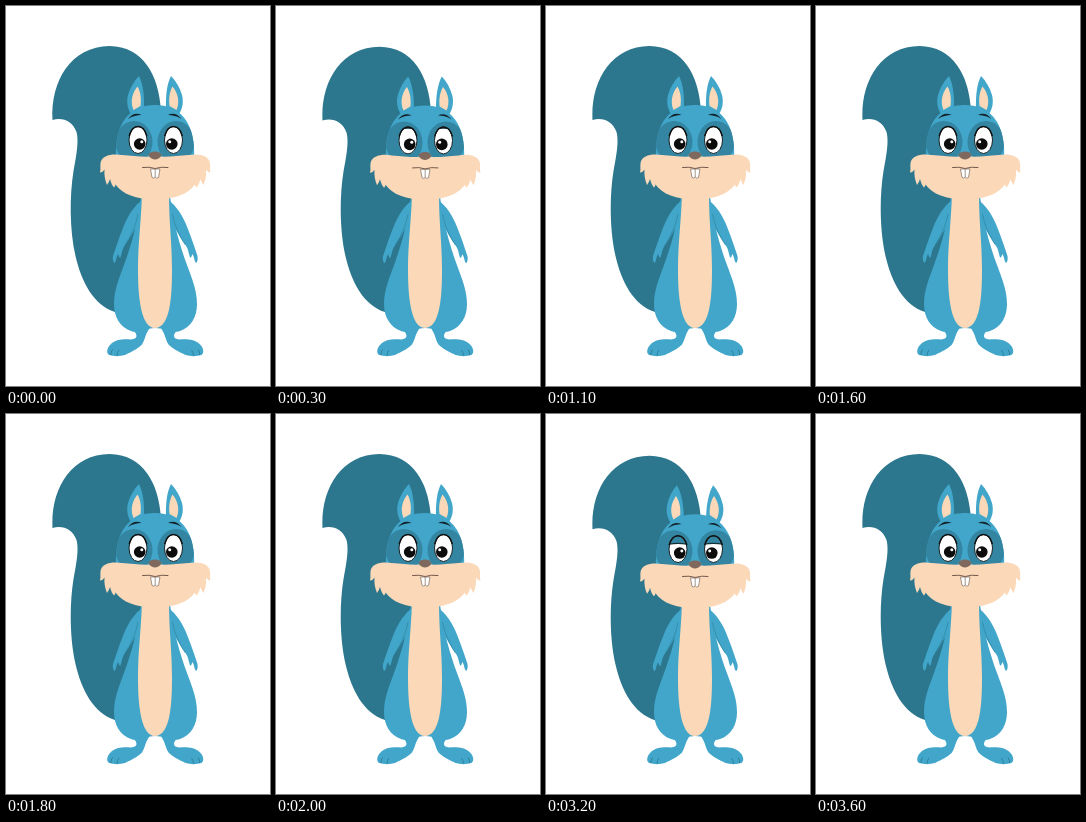
Write an HTML page that moves like this. It is 264 by 380 pixels and loops after 3800 ms.

```html
<!DOCTYPE html>
<html lang="en">
<head>
<meta charset="utf-8">
<title>Blue squirrel</title>
<style>
html, body { margin: 0; width: 100%; height: 100%; overflow: hidden; background: #fff; }
svg { display: block; width: 264px; height: 380px; }
.fur { fill: #41a6ca; }
.cream { fill: #fbd8b7; }
.mask { fill: #3485a1; }
</style>
</head>
<body>
<svg viewBox="0 0 264 380">
  <defs>
    <clipPath id="eyeClip"><ellipse cx="132" cy="134" rx="9" ry="13.500"/></clipPath>
    <clipPath id="headClip"><path d="M110 153C108 117 124 99 149 99C174 99 190 117 188 153Z"/></clipPath>

    <g id="ear"><g class="tilt">
      <path class="fur" d="M125 108C121 102 120.500 95 122 89C124.500 81 128 75 133 70C137 78 138.500 89 138 104Z"/>
      <path class="cream" d="M127.500 104C124 96 126 87 131.500 80.500C134.500 86 135.500 92 134.500 100Z"/>
    </g></g>

    <g id="arm">
      <path class="fur" d="M140 192C131 196 124 206 119 217C114 229 110 241 107 250C106.500 253 107 256 108.500 257C110.500 255 110 251 112 248C113 250 113 252 114.500 251.500C116 247 116 243 119 239C126 229 132 219 136 206Z"/>
      <path fill="none" stroke="#328aa8" stroke-width=".8" d="M132 208C130 219 125 230 119 239"/>
    </g>

    <g id="foot">
      <path class="fur" d="M124 322C132 327 133 333 125 333.500C117 333 109 333.500 104.500 338.500C101 342 100 347 103 349C108 350.500 114 350.500 119 349C125 346 132 343 136 338.500C139 334 139 329 143 323Z"/>
      <path fill="none" stroke="#2d7890" stroke-width=".8" d="M105 349Q104.500 346 106.500 343.500M111 349.500Q111 346.500 113 344"/>
    </g>

    <g id="eye">
      <ellipse cx="132" cy="134" rx="9" ry="13.500" fill="#fff"/>
      <g clip-path="url(#eyeClip)">
        <circle cx="133.700" cy="138" r="5.800" fill="#0c0c0c"/>
        <circle cx="135.800" cy="135.800" r="1.500" fill="#fff"/>
        <path class="lid mask" stroke="#143039" stroke-width="1.300"/>
      </g>
      <ellipse cx="132" cy="134" rx="9" ry="13.500" fill="none" stroke="#172226" stroke-width="1"/>
      <path class="lash" fill="none" stroke="#111" stroke-width="1.500" d="M123.200 130C125 123 128.500 120.500 132 120.500C135.500 120.500 139 123 140.800 130"/>
    </g>

    <path id="brow" fill="#14232a" d="M122 113C126 107.500 131 106.500 135.500 109C131 109 126.500 110 122 113Z"/>

    <path id="cheek" class="cream" d="M150 150C139 151.500 128 150 116 149C106 147.500 96 149 94.500 157C94 161 95 163 94 166.500C96.500 166.500 97.500 165 98.500 163.500C98 169 99 174 101 179C102.500 177 103.500 175 104 173C105 177 106.500 180 108 181.500C109 180.500 109.500 179.500 109.500 178.500C116 188 130 193.500 150 193.500Z"/>
  </defs>

  <g id="tail">
    <path fill="#2c778e" d="M46.500 114C44.500 75 65 40.500 103.500 40C137 40.500 153 69 155 105L146 300L109 306C87.500 299 75.500 276 69.500 250C63.500 224 63.500 190 67.500 165C70.500 149 73 135 70.500 126C66.500 115 56.500 111 46.500 114Z"/>
  </g>

  <use href="#foot"/>
  <use href="#foot" transform="matrix(-1 0 0 1 298.500 0)"/>

  <g id="torso">
    <path class="fur" d="M135 190H164C167 216 174 240 181 259C186 273 191 284 191 298C191 311 185 321 174 325C166 328 158 322 149 322C141 322 133 328 125 325C114 321 108 311 108 298C108 284 113 273 118 259C125 240 132 216 135 190Z"/>
    <use href="#arm"/>
    <use href="#arm" transform="matrix(-1 0 0 1 298.500 0)"/>
    <path class="cream" d="M136 188H163C163 218 166 236 166 264C166 291 164 322 149 322C135 322 132 291 132 264C132 236 135 218 136 188Z"/>
  </g>

  <g id="head">
    <use href="#ear"/>
    <use href="#ear" transform="matrix(-1 0 0 1 298 0)"/>
    <path class="fur" d="M110 153C108 117 124 99 149 99C174 99 190 117 188 153Z"/>
    <g clip-path="url(#headClip)" class="mask">
      <ellipse cx="128" cy="136" rx="18.500" ry="21"/>
      <ellipse cx="170" cy="136" rx="18.500" ry="21"/>
    </g>
    <use href="#cheek"/>
    <use href="#cheek" transform="matrix(-1 0 0 1 298.500 0)"/>
    <use href="#brow"/>
    <use href="#brow" transform="matrix(-1 0 0 1 297.500 0)"/>
    <use href="#eye"/>
    <use href="#eye" transform="matrix(-1 0 0 1 299.500 0)"/>
    <path fill="#7f695e" d="M142.500 149.500C143 146.500 146 145.500 149 145.500C152 145.500 155 146.500 155.500 149.500C154 152 151 153.500 149 153.500C147 153.500 144 152 142.500 149.500Z"/>
    <path fill="#fff" stroke="#8b7a70" stroke-width=".8" d="M144.500 163L146 171.500Q148 173 149.200 171Q150.500 173 152.500 171.500L154 163ZM149.200 163V171"/>
    <path fill="none" stroke="#75594c" stroke-width="1" stroke-linecap="round" d="M136.500 161.500Q143 160.500 149.200 162.500Q155.500 160.500 162 161.500"/>
  </g>
</svg>
<script>
const LOOP = 3800, BEAT = 950, START = 250, LENGTH = 250;
const [tail, torso, head] = ["tail", "torso", "head"].map(id => document.getElementById(id));
const ear = document.querySelector(".tilt");
const lid = document.querySelector(".lid");

// Squash toward the ground line.
const squash = (part, k) =>
  part.setAttribute("transform", `translate(0 ${350 * k}) scale(1 ${1 - k})`);

function draw(time) {
  const phase = ((time % LOOP) % BEAT - START) / LENGTH;
  const dip = phase > 0 && phase < 1 ? Math.sin(Math.PI * phase) ** 2 : 0;
  squash(tail, .0062 * dip);
  squash(torso, .004 * dip);
  squash(head, .0056 * dip);
  ear.setAttribute("transform", `rotate(${-4 * dip} 131 104)`);
  const edge = 118 + 12 * dip;
  lid.setAttribute("d", `M118 110V${edge + 1}Q132 ${edge - 2} 146 ${edge + 1}V110Z`);
}

let origin;
function tick(now) {
  origin ??= now;
  draw(now - origin);
  requestAnimationFrame(tick);
}
draw(0);
requestAnimationFrame(tick);
</script>
</body>
</html>
```
